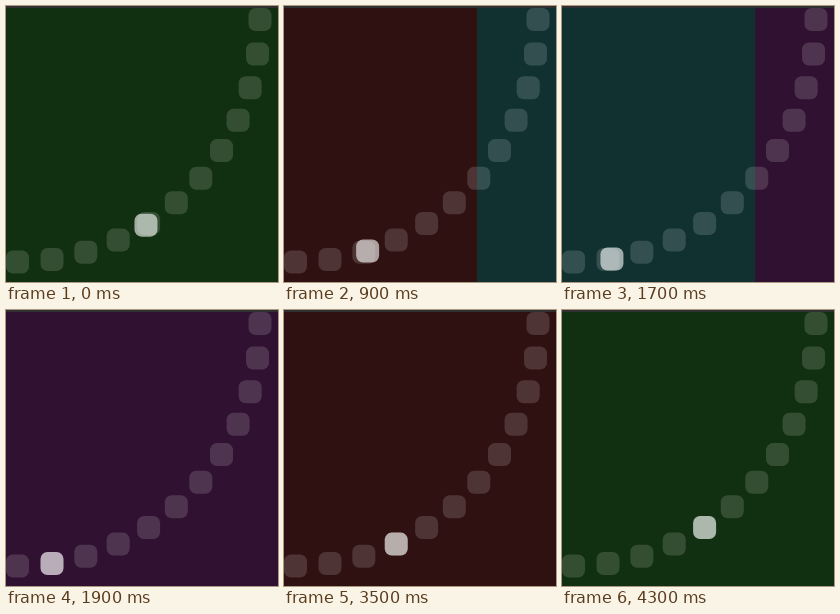
Recreate the animation shown at these times as an HTML page without scripts. Size 272 by 276 pixels, loop 4800 ms.

```html
<!DOCTYPE html>
<html lang="en">
<head>
<meta charset="utf-8">
<title>Arc pager</title>
<style>
/* current page, 0 to 3, fractional while turning */
@property --page { syntax: "<number>"; inherits: true; initial-value: 0; }

html, body { margin: 0; width: 100%; height: 100%; overflow: hidden; background: #303030; }

.stage {
  position: relative; width: 272px; height: 276px; overflow: hidden;
  animation: turn 4.8s step-end infinite;
}

.track {
  --w: 1680px;
  position: absolute; top: 2px; bottom: 0; left: 0;
  display: flex; width: calc(var(--w) * 4);
  transform: translateX(calc(var(--page) * var(--w) * -1));
}
.track i { flex: 1; }
.green { background: #113011; }
.red { background: #301111; }
.teal { background: #113131; }
.purple { background: #311131; }

/* twelve dots share a quarter circle, counted from the right end */
.dot {
  --a: calc(var(--i) * 90deg / 11);
  position: absolute; left: 0; top: 1.5px;
  width: 23px; height: 23px; border-radius: 7px;
  background: rgb(255 255 255 / .15);
  transform: translate(calc(cos(var(--a)) * 242.5px), calc(sin(var(--a)) * 242.5px));
}
.active { --i: calc(7 + var(--page)); background: rgb(255 255 255 / .6); }

.edge { position: absolute; top: 0; left: 0; width: 100%; height: 2px; background: #303030; }

@keyframes turn {
  0% { --page: .09; }
  2.083% { --page: .885; }
  4.166% { --page: .99; }
  6.25% { --page: 1; }
  16.666% { --page: 1.09; }
  18.75% { --page: 1.885; }
  20.833% { --page: 1.99; }
  22.916% { --page: 2; }
  33.333% { --page: 2.09; }
  35.416% { --page: 2.885; }
  37.5% { --page: 2.99; }
  39.583% { --page: 3; }
  52.083% { --page: 2.93; }
  54.166% { --page: 2.14; }
  56.25% { --page: 2; }
  68.75% { --page: 1.93; }
  70.833% { --page: 1.14; }
  72.916% { --page: 1; }
  85.416% { --page: .93; }
  87.5% { --page: .14; }
  89.583%, 100% { --page: 0; }
}
</style>
</head>
<body>
<div class="stage">
  <div class="track"><i class="green"></i><i class="red"></i><i class="teal"></i><i class="purple"></i></div>
  <i class="dot" style="--i:0"></i>
  <i class="dot" style="--i:1"></i>
  <i class="dot" style="--i:2"></i>
  <i class="dot" style="--i:3"></i>
  <i class="dot" style="--i:4"></i>
  <i class="dot" style="--i:5"></i>
  <i class="dot" style="--i:6"></i>
  <i class="dot" style="--i:7"></i>
  <i class="dot" style="--i:8"></i>
  <i class="dot" style="--i:9"></i>
  <i class="dot" style="--i:10"></i>
  <i class="dot" style="--i:11"></i>
  <i class="dot active"></i>
  <div class="edge"></div>
</div>
</body>
</html>
```
